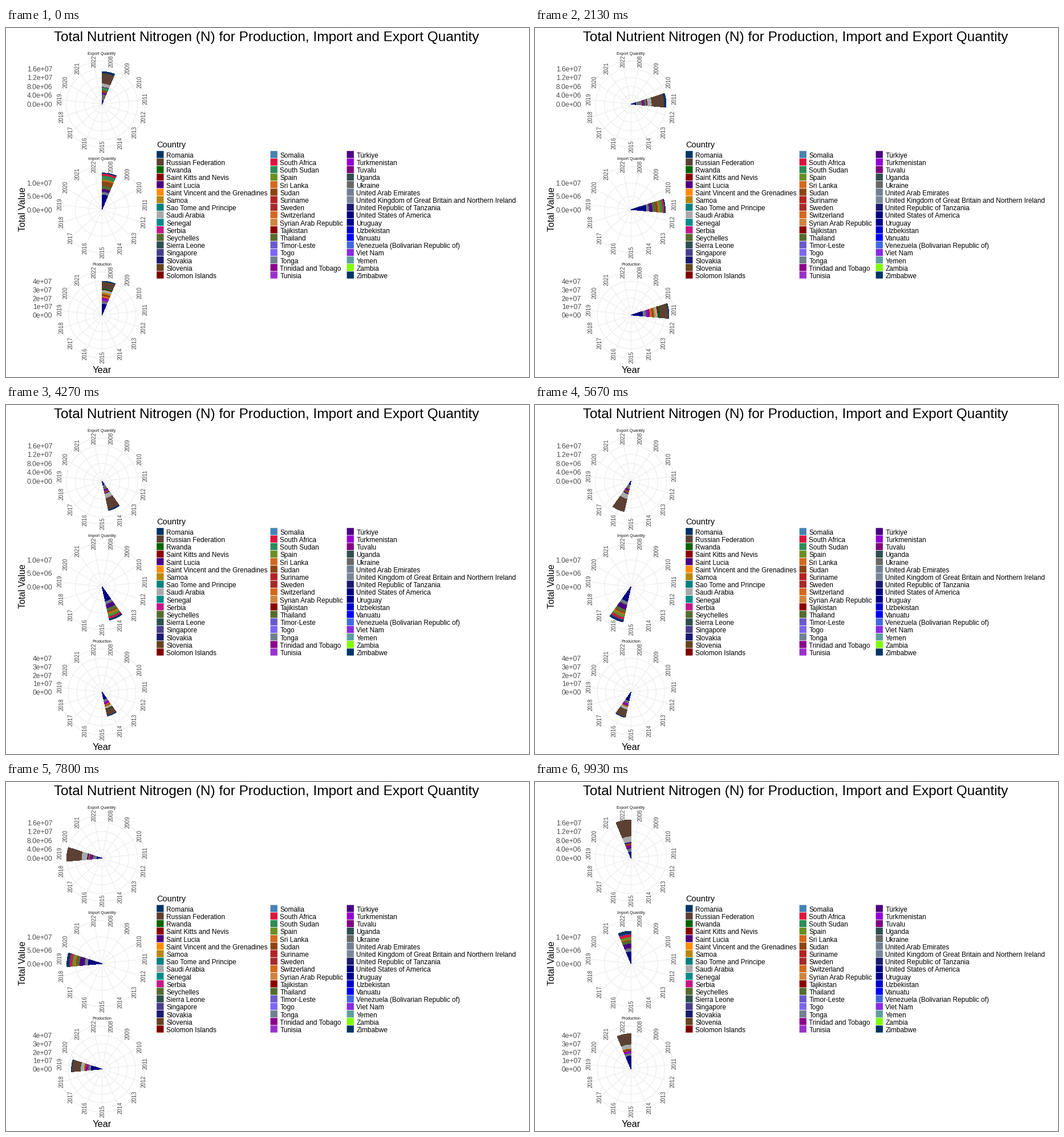
A matplotlib script for the animation above (10 s loop, 917 by 611 pixels).

```python
import numpy as np
import matplotlib.pyplot as plt
from matplotlib.animation import FuncAnimation
from matplotlib.patches import Circle, Rectangle, Wedge

W, H, DPI = 917, 611, 100
FRAMES, INTERVAL = 250, 40
YEARS = range(2008, 2023)
BAR = .95                                  # bar width in years
STEP = 360 / (len(YEARS) - 1 + BAR)        # degrees per year
CX, R_GRID = 168.3, 75.4
GRID, AXIS_TEXT = "#EBEBEB", "#4D4D4D"

plt.rcParams["font.family"] = "Liberation Sans"

COUNTRIES = [
    {
        "Romania": "#003366", "Russian Federation": "#5C4033",
        "Rwanda": "darkgreen", "Saint Kitts and Nevis": "darkred",
        "Saint Lucia": "indigo",
        "Saint Vincent and the Grenadines": "darkorange",
        "Samoa": "darkgoldenrod", "Sao Tome and Principe": "teal",
        "Saudi Arabia": "darkgray", "Senegal": "darkcyan",
        "Serbia": "mediumvioletred", "Seychelles": "darkolivegreen",
        "Sierra Leone": "darkslategray", "Singapore": "darkslateblue",
        "Slovakia": "midnightblue", "Slovenia": "#654321",
        "Solomon Islands": "maroon",
    },
    {
        "Somalia": "steelblue", "South Africa": "crimson",
        "South Sudan": "seagreen", "Spain": "olivedrab",
        "Sri Lanka": "chocolate", "Sudan": "saddlebrown",
        "Suriname": "firebrick", "Sweden": "brown",
        "Switzerland": "chocolate", "Syrian Arab Republic": "peru",
        "Tajikistan": "darkred", "Thailand": "darkolivegreen",
        "Timor-Leste": "slateblue", "Togo": "mediumslateblue",
        "Tonga": "slategray", "Trinidad and Tobago": "darkmagenta",
        "Tunisia": "darkorchid",
    },
    {
        "Türkiye": "indigo", "Turkmenistan": "darkviolet",
        "Tuvalu": "purple", "Uganda": "darkslategray",
        "Ukraine": "dimgray", "United Arab Emirates": "slategray",
        "United Kingdom of Great Britain and Northern Ireland":
            "lightslategray",
        "United Republic of Tanzania": "midnightblue",
        "United States of America": "navy", "Uruguay": "darkblue",
        "Uzbekistan": "mediumblue", "Vanuatu": "blue",
        "Venezuela (Bolivarian Republic of)": "royalblue",
        "Viet Nam": "blueviolet", "Yemen": "cadetblue",
        "Zambia": "chartreuse", "Zimbabwe": "#003366",
    },
]
COLORS = {name: c for col in COUNTRIES for name, c in col.items()}

# Layer weights, innermost first, are given for these years.
KEY_YEARS = [2008, 2012, 2016, 2022]

PANELS = [
    dict(
        title="Export Quantity", cy=133.4, ring=15.6,
        ticks=["0.0e+00", "4.0e+06", "8.0e+06", "1.2e+07", "1.6e+07"],
        radius=[57, 56.4, 58, 61.5, 54, 53, 52.5, 54, 54.5, 60, 60.5,
                61.8, 67.5, 64, 67.3],
        layers={
            "United States of America": (8, 9, 8, 12),
            "Tonga": (2, 2, 2, 3),
            "Ukraine": (8, 7, 5, 3),
            "Türkiye": (1, 1, 2, 2),
            "Trinidad and Tobago": (2, 3, 2, 4),
            "Sudan": (4, 0, 1.5, 2),
            "South Sudan": (5, 1, 1, .5),
            "South Africa": (.5, 1, 1, .5),
            "Slovakia": (.5, 1, 1.5, 2),
            "Saudi Arabia": (6, 7, 9, 10),
            "Russian Federation": (18, 20.5, 22.5, 29),
            "Romania": (2.5, 2.5, 0, 0),
        }),
    dict(
        title="Import Quantity", cy=318, ring=23.4,
        ticks=["0.0e+00", "5.0e+06", "1.0e+07"],
        radius=[64.3, 54, 64, 60, 55, 58.3, 60, 64, 63.5, 66, 60, 61.5,
                62, 60, 57],
        layers={
            "United States of America": (28, 27, 27, 22),
            "Tonga": (3, 3, 4, 4),
            "Ukraine": (2, 1.5, 2, 2),
            "Türkiye": (5, 6, 8, 8),
            "Thailand": (6, 6, 5, 5),
            "Sudan": (8, 2, 2, 1),
            "Sri Lanka": (2, 2, 2, 1),
            "Spain": (2, 3, 4, 4),
            "South Sudan": (6, 3, 1, .5),
            "South Africa": (3.5, 2.5, 3.5, 4),
            "Singapore": (.5, .5, 1.5, 2),
            "Romania": (.7, .5, 2.5, 4),
        }),
    dict(
        title="Production", cy=502.6, ring=14.75,
        ticks=["0e+00", "1e+07", "2e+07", "3e+07", "4e+07"],
        radius=[59.5, 54, 61.5, 66.5, 64, 42.6, 43, 43, 45.5, 47.6, 51,
                53.5, 56, 59, 62],
        layers={
            "United States of America": (20, 21, 17, 24),
            "United Arab Emirates": (2, 3, 2, 2),
            "Ukraine": (3, 3, 3, 2),
            "Turkmenistan": (3, 3, 2, 2),
            "Trinidad and Tobago": (2, 3, 2.5, 2),
            "Sri Lanka": (3, 4, .5, .5),
            "Sudan": (3, 2.5, .8, 3),
            "Samoa": (3, 2.5, 1, 1),
            "Saudi Arabia": (4, 4, 4.5, 7),
            "Saint Kitts and Nevis": (1, 2, 0, 0),
            "Rwanda": (2, 3, .3, .3),
            "Russian Federation": (11.5, 14.5, 13.5, 18),
            "Romania": (.5, .7, .3, 0),
        }),
]

fig = plt.figure(figsize=(W / DPI, H / DPI), dpi=DPI, facecolor="white")
ax = fig.add_axes([0, 0, 1, 1])
ax.set_xlim(0, W)
ax.set_ylim(H, 0)
ax.axis("off")


def px(n):
    return n * 72 / DPI


def label(x, y, text, size, color="black", ha="left", rotation=0):
    ax.text(x, y, text, fontsize=px(size), color=color, ha=ha,
            va="baseline", rotation=rotation, rotation_mode="anchor",
            zorder=5)


def draw_panel(p):
    cy = p["cy"]
    line = dict(color=GRID, lw=px(1), zorder=1)
    rings = [p["ring"] * k for k in range(1, len(p["ticks"]))]
    for r in rings + [R_GRID]:
        ax.add_patch(Circle((CX, cy), r, fill=False, **line))
    for i, year in enumerate(YEARS):
        a = np.radians((i + BAR / 2) * STEP)
        dx, dy = R_GRID * np.sin(a), -R_GRID * np.cos(a)
        ax.plot([CX, CX + dx], [cy, cy + dy], **line)
        label(CX + dx + 4.4, cy + dy - 1.4, str(year), 9.7, AXIS_TEXT,
              "center", 90)
    for k, tick in enumerate(p["ticks"]):
        label(81, cy - k * p["ring"] + 4.6, tick, 12.1, AXIS_TEXT, "right")
    label(CX - .3, cy - 86.8, p["title"], 7.2, "#1A1A1A", "center")


def stack_edges(p):
    """Ring edges of the stacked bar, one row per year."""
    parts = np.array([np.interp(YEARS, KEY_YEARS, v)
                      for v in p["layers"].values()]).T
    edges = np.cumsum(parts, axis=1)
    return edges / edges[:, -1:] * np.array(p["radius"])[:, None]


def make_bar(p):
    return [ax.add_patch(Wedge((CX, p["cy"]), 1, 0, STEP, width=1, lw=0,
                               fc=COLORS[name], antialiased=False, zorder=3))
            for name in p["layers"]]


def draw_legend():
    label(263.8, 209.2, "Country", 14.5)
    for x, column in zip((264.2, 463.6, 597.6), COUNTRIES):
        for row, (name, color) in enumerate(column.items()):
            y = 215.3 + row * 13.19
            ax.add_patch(Rectangle((x, y), 12.3, 12.3, fc=color, lw=0,
                                   snap=False))
            label(x + 16.8, y + 11.6, name, 11.93)


label(456.5, 23, "Total Nutrient Nitrogen (N) for Production, "
      "Import and Export Quantity", 24.37, ha="center")
label(168.5, 604, "Year", 16.4, ha="center")
label(33.8, 317, "Total Value", 15.9, ha="center", rotation=90)
draw_legend()
for panel in PANELS:
    draw_panel(panel)

bars = [(make_bar(p), stack_edges(p)) for p in PANELS]

# The years are spread over 150 ticks of 200/3 ms each.
ticks = [int(i * 149 / 14 + .5) for i in range(len(YEARS))]
starts = [t * 200 // 3 // INTERVAL for t in ticks]


def update(frame):
    i = np.searchsorted(starts, frame, side="right") - 1
    start = i * STEP - 90
    artists = []
    for wedges, edges in bars:
        inner = 0
        for wedge, outer in zip(wedges, edges[i]):
            wedge.set_theta1(start)
            wedge.set_theta2(start + BAR * STEP)
            wedge.set_radius(outer)
            wedge.set_width(outer - inner)
            wedge.set_visible(outer > inner)
            inner = outer
        artists += wedges
    return artists


anim = FuncAnimation(fig, update, frames=FRAMES, interval=INTERVAL,
                     repeat=True, repeat_delay=0, blit=False)
plt.show()
```
